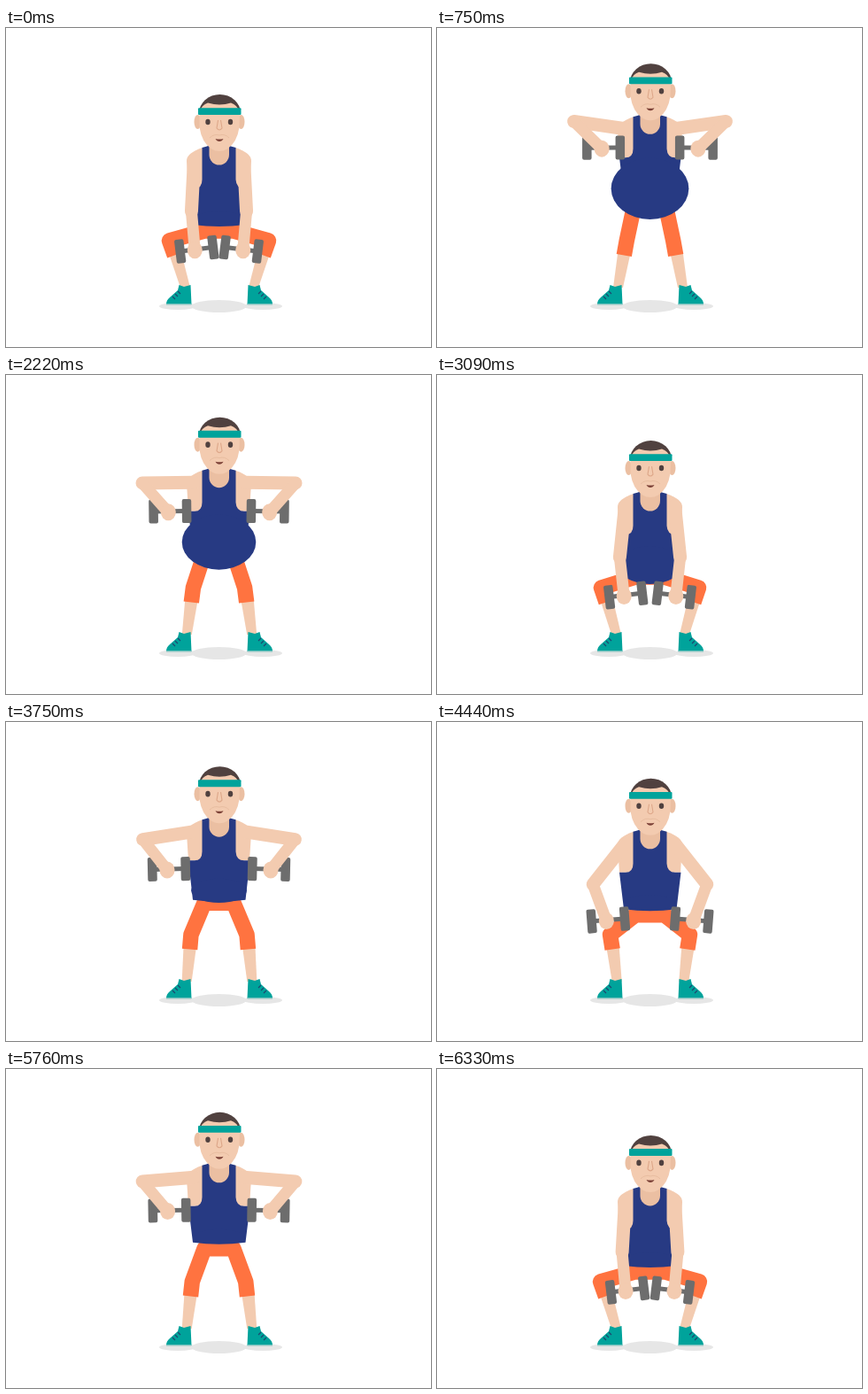
Animation of 480 by 360 pixels, one loop 6.36 s. Source, as an HTML page:

```html
<!DOCTYPE html>
<html lang="en">
<head>
<meta charset="utf-8">
<title>Squat workout</title>
<style>
  html, body { margin: 0; width: 100%; height: 100%; overflow: hidden; background: #fff; }
  svg { display: block; width: 480px; height: 360px; }
  .skin { fill: #f3cbb0; }
  .shirt { fill: #273a83; }
  .teal { fill: #00a39b; }
  .iron { fill: #6d6d6d; }
  .hair { fill: #50413f; }
  .shadow { fill: #e6e6e6; }
  .limb { fill: none; stroke: #f3cbb0; stroke-linecap: round; }
  .shorts { fill: none; stroke: #ff7340; stroke-width: 17.5; stroke-linejoin: round; }
</style>
</head>
<body>
<svg viewBox="0 0 480 360">
  <g class="shadow">
    <ellipse cx="240.500" cy="314" rx="31" ry="7"/>
    <ellipse cx="194" cy="314" rx="21" ry="4"/>
    <ellipse cx="290" cy="314" rx="22" ry="4"/>
  </g>

  <g id="foot">
    <path id="shin" class="skin"/>
    <path class="teal" d="M195.500 290 L201 292 L208.500 290 L209.500 312 H181 Q181 307 185 304 L194 296Z"/>
    <path d="M181 312 H209.500" stroke="#a9cfcc" stroke-width="1.500"/>
    <path d="M188 303 l3 3 M191 300 l3 3 M194 297 l3 3" stroke="#1d4770" stroke-width="1.200"/>
  </g>
  <use href="#foot" transform="translate(482 0) scale(-1 1)"/>

  <path id="shorts" class="shorts"/>

  <g id="body">
    <path class="skin" d="M222 135 Q204 141 204 150 L206 181 H275 L277 150 Q277 141 259 135Z"/>
    <path id="torso" class="shirt"/>
    <ellipse id="belly" class="shirt" cx="240.500"/>
    <path d="M229.500 128 V143 A11.250 11.500 0 0 0 252 143 V128Z" fill="#ebbfa2"/>
  </g>

  <g id="arm">
    <g id="bell" class="iron">
      <rect x="-18" y="-2.500" width="36" height="5"/>
      <rect x="-24" y="-13.500" width="10.500" height="27" rx="2"/>
      <rect x="13.500" y="-13.500" width="10.500" height="27" rx="2"/>
    </g>
    <path id="upper" class="limb" stroke-width="15"/>
    <path id="fore" class="limb" stroke-width="13"/>
    <ellipse id="fist" class="skin" rx="8.500" ry="9.500"/>
  </g>
  <use href="#arm" transform="translate(481 0) scale(-1 1)"/>

  <g id="head">
    <g fill="#ebbfa2">
      <ellipse cx="216.500" cy="106" rx="4" ry="8"/>
      <ellipse cx="265.500" cy="106" rx="4" ry="8"/>
    </g>
    <path class="hair" d="M218 96 A23.500 21 0 0 1 265 96Z"/>
    <path class="skin" d="M218.500 95 Q221 86.500 228 84.500 Q235 86.500 241 86.500 Q248 86.500 254 84.500 Q261 86.500 264 95 L263.500 112 Q261 129 250 136.500 Q241 141.500 232 136.500 Q221 129 218.500 112Z"/>
    <rect class="teal" x="217" y="90.200" width="48.500" height="7.800" rx="1"/>
    <g class="hair">
      <ellipse cx="228" cy="106" rx="2.700" ry="3.300"/>
      <ellipse cx="253.500" cy="106" rx="2.700" ry="3.300"/>
    </g>
    <path d="M239.500 104 L238 113 Q241 117 244 113 L242.500 104" fill="none" stroke="#dda789" stroke-width="1.100"/>
    <path d="M230 124 Q235 119 241 121 Q247 119 252 124" fill="none" stroke="#e8bda0" stroke-width="1"/>
    <path d="M236.500 125 Q241 126 245.500 125 Q244 128 241 128 Q238 128 236.500 125Z" fill="#7b4036"/>
  </g>
</svg>
<script>
  const LOOP = 6360, REP = 1590, STEP = 30;
  const el = id => document.getElementById(id);
  const set = (id, attrs) => {
    for (const k in attrs) el(id).setAttribute(k, attrs[k]);
  };
  const mix = (a, b, k) => a + (b - a) * k;
  const ease = (t, from, to) => {
    const k = Math.min(1, Math.max(0, (t - from) / (to - from)));
    return (1 - Math.cos(Math.PI * k)) / 2;
  };
  // Angle in degrees, measured outwards from straight down
  const reach = ([x, y], len, deg) => {
    const a = deg * Math.PI / 180;
    return [x + len * Math.sin(a), y + len * Math.cos(a)];
  };
  const line = (...pts) => "M" + pts.map(p => p.join(" ")).join(" L");
  const mirror = ([x, y]) => [481 - x, y];

  function drawLegs(rise, dy) {
    const knee = [184.5 + 30 * rise, 240];
    const ankle = [mix(203, 205, rise), 292];
    const hem = [mix(knee[0], ankle[0], 0.32), 256.5];
    const hip = [224, 229 + dy];
    set("shin", { d: line([hem[0] - 7, 253], [hem[0] + 7.5, 253],
      [ankle[0] + 5, 293], [ankle[0] - 6, 293]) + "Z" });
    const side = [hem, knee, hip];
    set("shorts", { d: line(...side, ...side.map(mirror).reverse()) });
  }

  function drawArms(rise, dy) {
    const shoulder = [212.5, 148.5 + dy];
    const elbow = reach(shoulder, 58.5, -(3 + 96 * rise));
    const hand = reach(elbow, 44, 5 + 41 * rise);
    set("upper", { d: line(shoulder, elbow) });
    set("fore", { d: line(elbow, hand) });
    set("fist", { cx: hand[0], cy: hand[1] });
    set("bell", { transform:
      `translate(${hand[0] + 2} ${hand[1] - 1}) rotate(${-7 * (1 - rise)})` });
  }

  function drawBody(fat, dy) {
    const hem = 222 + 22 * fat * (1 - fat);
    set("torso", { d: `M221.500 135 Q226 134 231 132 H250 Q255 134 259.500 135
      V171 Q260 181 269 181 H275.500 L270.500 ${hem} Q240.500 ${hem + 4} 211 ${hem}
      L206 181 H213 Q221.500 181 221.500 171Z` });
    set("belly", { cy: 215 + fat, rx: mix(28, 44, fat), ry: mix(8, 35, fat) });
    const transform = `translate(0 ${dy})`;
    set("body", { transform });
    set("head", { transform });
  }

  function draw(now) {
    const t = Math.floor(now % LOOP / STEP) * STEP;
    const rise = (1 - Math.cos(2 * Math.PI * t / REP)) / 2;
    const lift = t < REP ? 35 : 30.5;
    const dy = -lift * rise;
    const fat = ease(t, 0, 800) * (1 - ease(t, 1400, 4770));
    drawLegs(rise, dy);
    drawBody(fat, dy);
    drawArms(rise, dy);
  }

  const start = performance.now();
  function tick() {
    draw(performance.now() - start);
    requestAnimationFrame(tick);
  }
  tick();
</script>
</body>
</html>
```
